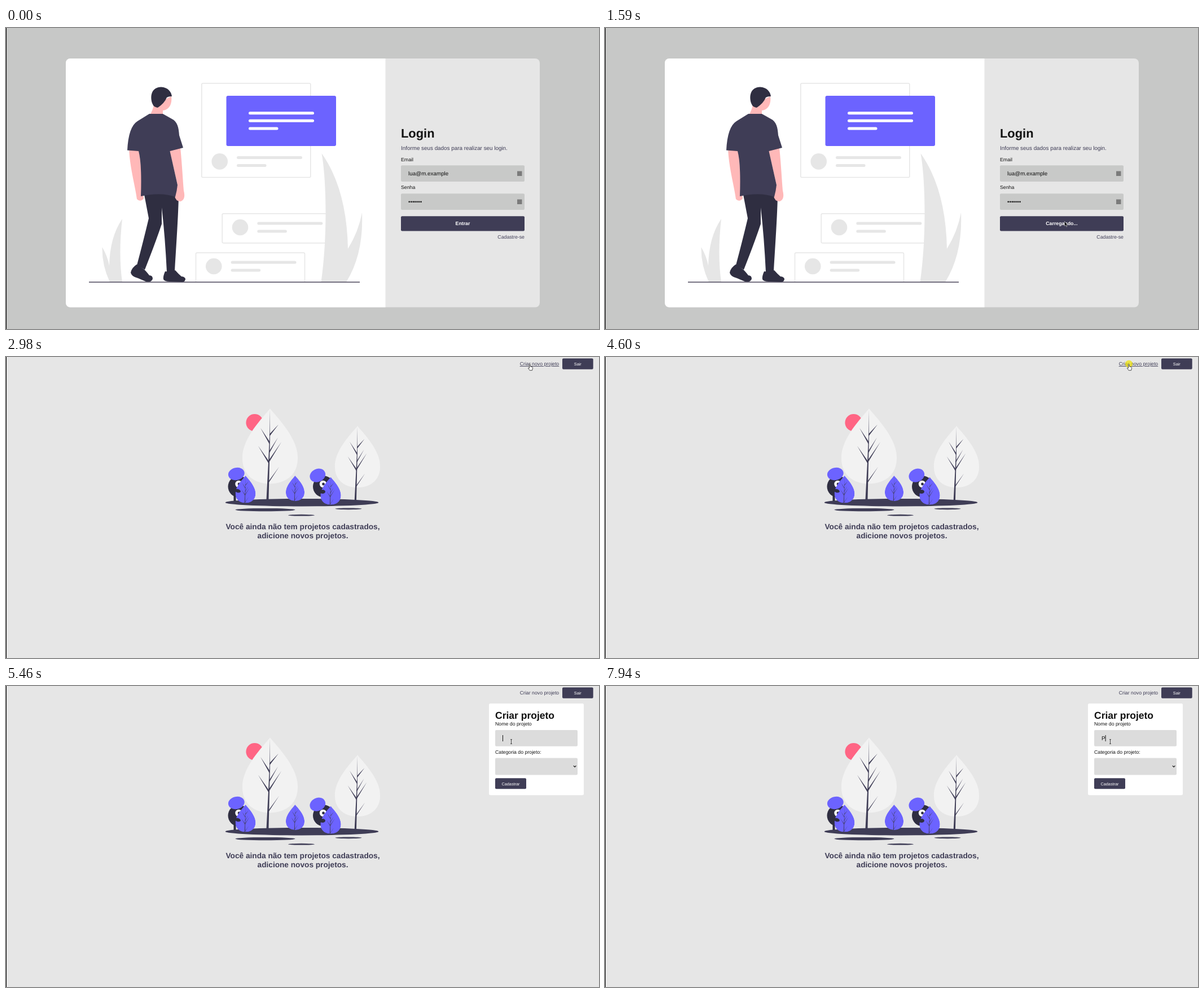
An HTML page for the animation above (8000 ms loop, 1051 by 533 pixels).

```html
<!DOCTYPE html>
<html lang="pt">
<head>
<meta charset="utf-8">
<title>Login e projetos</title>
<style>
  html, body { margin: 0; width: 100%; height: 100%; overflow: hidden; background: #e6e6e6; }
  svg { display: block; }
  text { font: 8.76px "Liberation Sans", Arial, sans-serif; fill: #111; text-rendering: geometricPrecision; white-space: pre; }
  .b { font-weight: bold; }
  .mid { text-anchor: middle; }
  .end { text-anchor: end; }
  .field { font-size: 9.85px; }
  .small { font-size: 7.3px; }
  .notice { font-size: 13.66px; }
  .white { fill: #fff; }
  .ink { fill: #3f3d56; }
  .hair { fill: #2f2e41; }
  .skin { fill: #ffb8b8; }
  .grey { fill: #e6e6e6; }
  .purple { fill: #6c63ff; }
  .input { fill: #c8c9c8; }
  .pale { fill: #dcdcdc; }
  .card { fill: none; stroke: #e6e6e6; stroke-width: 1.5; }
</style>
</head>
<body>
<svg width="1051" height="533" viewBox="0 0 1051 533">
  <defs>
    <path id="crown" d="M0 0C-14 17-50 53-49 88C-49 117-28 133 0 133C28 133 49 117 49 88C50 53 14 17 0 0Z"/>
    <clipPath id="leafClip"><use href="#crown"/></clipPath>
    <g id="trunk" class="ink">
      <path d="M0 2L-.2 60L-2.5 161H-6.5L-3 95L-1 50Z"/>
      <path d="M-1 63L-17 34L-1 58ZM-2 98L-21 66L-2 93Z"/>
      <path d="M-1 49L15 28L-1 45ZM-2 80L14 51L-2 76ZM-3 97L20 59L-2 91ZM-3 132L16 103L-3 129Z"/>
    </g>
    <g id="tree"><use href="#crown" fill="#f2f2f2"/><use href="#trunk"/></g>
    <g id="bush" clip-path="url(#leafClip)"><use href="#crown" class="purple"/><use href="#trunk"/></g>
    <rect id="long" y="-2.5" width="116" height="5" rx="2.5"/>
    <rect id="short" y="-2.5" width="52.5" height="5" rx="2.5"/>
    <g id="entry" class="grey">
      <circle r="14.3"/><use href="#long" x="30.3" y="-7"/><use href="#short" x="30.3" y="7"/>
    </g>
    <g id="eye"><circle r="6.2" fill="#fff"/><circle class="hair" cx=".5" r="2.4"/></g>
  </defs>

  <g id="login">
    <rect width="1051" height="533" fill="#c7c8c7"/>
    <rect class="grey" x="106" y="54" width="840" height="440.5" rx="8"/>
    <path class="white" d="M672.5 54H114a8 8 0 0 0-8 8V486.5a8 8 0 0 0 8 8H672.5Z"/>

    <rect class="card" x="346.8" y="98" width="193" height="166.5" rx="2"/>
    <use href="#entry" x="378.7" y="236.4"/>
    <rect class="purple" x="390.5" y="120" width="194.5" height="89" rx="3"/>
    <g class="white">
      <use href="#long" x="430" y="150.7"/><use href="#long" x="430" y="164.3"/><use href="#short" x="430" y="178"/>
    </g>
    <rect class="card" x="383.2" y="328.8" width="193" height="52" rx="2"/>
    <use href="#entry" x="415" y="353"/>
    <path class="card" d="M336.5 450V400q0-2 2-2H527.5q2 0 2 2V450"/>
    <use href="#entry" x="368.3" y="422"/>
    <path class="grey" d="M184 450Q170 420 170.5 388Q180 404 183 421Q184 370 206 338Q199 400 206 450Z
      M559.5 222Q604 285 606 391Q625 360 631 327Q634 400 603 450H558.5C570 370 568 270 559.5 222Z"/>

    <path class="skin" d="M293 121C295 136 288 145 278 146V154H255Q260 146 262 136Z
      M218 215L236 217C239 240 241 265 242 283L244 302Q238 309 232 303C229 280 220 250 218 215Z"/>
    <g class="hair">
      <path d="M259 133C255 120 258 105 275 104.500C287 105 293 113 294 121Q288 121 285 123Q281 133 269 141Q263 140 261 137Z"/>
      <path d="M245 295Q275 289 306 299C305 340 301 395 299 432H285Q282 370 276 318V347Q265 380 246 428L232 420Q244 375 253 337Z"/>
      <path d="M232 418.500Q223 424 221 433Q222 440 234 443L248 449Q258 451 260 444Q260 438 254 438Q248 430 244 427Z"/>
      <path d="M282 431Q278 440 279 445Q281 449 290 449L313 450Q318 449 318 444Q316 440 311 440Q306 436 300 429Q295 432 282 431Z"/>
    </g>
    <path class="skin" d="M290 217L309 212C312 240 313 265 315 288Q319 303 310 307Q300 307 299 297L304 278Z"/>
    <path class="ink" d="M254 152L278 152L294 161C304 166 306 176 307 190L314 212L290.5 218L304 278Q303 288 300 299Q275 290 239 298Q241 240 235 218L215 216.5Q217 175 233 165Z"/>
    <path d="M147 450H627" stroke="#4a4459" stroke-width="1.5"/>

    <text class="b" x="700" y="194" style="font-size:21.9px">Login</text>
    <text class="field ink" x="700" y="216.2">Informe seus dados para realizar seu login.</text>
    <text x="700" y="235.5">Email</text>
    <rect class="input" x="700" y="243.3" width="219" height="28.7" rx="2"/>
    <text class="field" x="713" y="261">lua@m.example</text>
    <text x="700" y="285.4">Senha</text>
    <rect class="input" x="700" y="293.2" width="219" height="28.7" rx="2"/>
    <text class="field" x="713" y="311">•••••••</text>
    <path fill="#7b7b7b" d="M906 253.5h8.5v8.5h-8.5ZM906 303.5h8.5v8.5h-8.5Z"/>
    <rect class="ink" x="700" y="333.3" width="219" height="26.2" rx="2"/>
    <text id="submit" class="b mid white" x="809.5" y="349"></text>
    <text class="end ink" x="919" y="372.6">Cadastre-se</text>
  </g>

  <g id="home">
    <rect class="grey" width="1051" height="533"/>
    <circle cx="440.7" cy="116.3" r="15.3" fill="#ff6584"/>
    <ellipse class="ink" cx="524.5" cy="257.7" rx="135.8" ry="6.8"/>
    <ellipse class="ink" cx="459.5" cy="270.6" rx="53" ry="2.7"/>
    <ellipse class="ink" cx="523.5" cy="280.2" rx="23.5" ry="1.4"/>
    <ellipse class="ink" cx="607" cy="268.8" rx="23.5" ry="1.4"/>
    <use href="#tree" transform="translate(468 91.5)"/>
    <use href="#tree" transform="translate(623 122.3) scale(.818)"/>
    <g class="hair">
      <circle cx="412.5" cy="229.5" r="19"/><rect x="403.5" y="243" width="4" height="12"/>
      <circle cx="563" cy="229.5" r="19"/>
    </g>
    <ellipse class="purple" cx="408.3" cy="207" rx="14.5" ry="11" transform="rotate(-12 408.3 207)"/>
    <ellipse class="purple" cx="552.3" cy="209.7" rx="14.3" ry="11.5" transform="rotate(-25 552.3 209.7)"/>
    <use href="#eye" x="412.5" y="225"/>
    <use href="#eye" x="562" y="225"/>
    <use href="#bush" transform="translate(424.5 210) scale(.365)"/>
    <use href="#bush" transform="translate(512.5 210) scale(.338)"/>
    <use href="#bush" transform="translate(575.5 212.5) scale(.37)"/>
    <ellipse class="hair" cx="410.5" cy="237" rx="5.5" ry="3" transform="rotate(15 410.5 237)"/>
    <ellipse class="hair" cx="561" cy="238.5" rx="5" ry="3.5"/>
    <text class="notice b mid ink" x="526" y="305.2">Você ainda não tem projetos cadastrados,</text>
    <text class="notice b mid ink" x="526" y="321.2">adicione novos projetos.</text>
    <text id="link" class="ink" x="910.7" y="15">Criar novo projeto</text>
    <rect class="ink" x="986" y="2.5" width="54.7" height="19.3" rx="2"/>
    <text class="small mid white" x="1013.3" y="15">Sair</text>

    <g id="panel">
      <rect class="white" x="856" y="31" width="168" height="162.3" rx="2.5"/>
      <text class="b" x="867" y="58" style="font-size:17.5px">Criar projeto</text>
      <text x="867" y="70">Nome do projeto</text>
      <rect class="pale" x="867" y="78" width="146" height="28.8" rx="2"/>
      <text id="typed" class="field" x="880" y="95.6">P</text>
      <rect id="caret" y="87" width="1" height="11" fill="#111"/>
      <text x="867" y="120">Categoria do projeto:</text>
      <rect class="pale" x="867" y="127.6" width="146" height="30" rx="2"/>
      <path d="M1005.8 141.2l2.3 2.3 2.3-2.3" fill="none" stroke="#111" stroke-width="1.2"/>
      <rect class="ink" x="867" y="163.3" width="55" height="19" rx="2"/>
      <text class="small mid white" x="894.5" y="175.5">Cadastrar</text>
    </g>
  </g>

  <path d="M.5 0V533" stroke="#000"/>
  <g id="cursor">
    <circle id="click" r="6.5" fill="#f0e400" opacity=".7"/>
    <path id="arrow" d="M0 0V8L1.8 6.4L3.2 9.5L4.5 9L3.2 6H5.5Z" fill="#000" stroke="#fff" stroke-width=".5"/>
    <path id="hand" d="M-.8 .8Q0-.5 .8 .8V4.5L4.5 5.6Q5.3 6 5 7.5L4 11.5H-.3L-3 7.6Q-3 6-.8 7.5Z" fill="#fff" stroke="#222" stroke-width=".8"/>
    <path id="beam" d="M-1.5-3.8H1.5M0-3.8V3.8M-1.5 3.8H1.5" fill="none" stroke="#222" stroke-width=".8"/>
  </g>
</svg>
<script>
const $ = id => document.getElementById(id);
const show = (id, on) => $(id).style.display = on ? '' : 'none';
const between = (v, a, b) => v >= a && v < b;
const inAny = (t, spans) => spans.some(([a, b]) => between(t, a, b));

// Pointer moves: start, end, number of steps, from, to
const moves = [
  [70, 510, 7, [985, 500], [788, 312]],
  [740, 890, 3, [788, 312], [814.5, 342.5]],
  [2210, 2980, 11, [814.5, 342.5], [928.5, 12.2]],
  [5000, 5150, 3, [928.5, 12.2], [895.5, 98.5]]
];
const clicks = [[1440, 1520], [4600, 4690], [5380, 5460]];
const caretOn = [[5380, 5920], [6380, 6930], [7480, 8000]];

function pointerAt(t) {
  const [start, end, steps, from, to] = moves.filter(m => t >= m[0]).pop() || moves[0];
  const step = 1 + Math.floor((t - start) / (end - start) * (steps - 1) + 1e-6);
  const k = Math.min(1, Math.max(0, step / steps));
  const eased = k * k * (3 - 2 * k);
  return from.map((v, i) => v + (to[i] - v) * eased);
}

function draw(t) {
  const home = t >= 1670, panel = t >= 4690, loading = t >= 1520, typed = t >= 7940;
  const [x, y] = pointerAt(t);
  const onLink = home && between(x, 910, 981) && between(y, 5, 18);
  const onButton = !home && !loading && between(x, 700, 919) && between(y, 333, 360);
  const onField = home
    ? panel && between(x, 867, 1013) && between(y, 78, 107)
    : between(x, 700, 919) && (between(y, 243, 272) || between(y, 293, 322));

  show('login', !home);
  show('home', home);
  show('panel', panel);
  $('submit').textContent = loading ? 'Carregando...' : 'Entrar';
  $('link').style.textDecoration = onLink ? 'underline' : 'none';

  show('typed', typed);
  show('caret', inAny(t, caretOn));
  $('caret').setAttribute('x', typed ? 886.6 : 880);

  show('cursor', t >= 70);
  $('cursor').setAttribute('transform', `translate(${x} ${y})`);
  show('click', inAny(t, clicks));
  show('hand', onLink || onButton);
  show('beam', onField);
  show('arrow', !onLink && !onButton && !onField);
}

const began = performance.now();
function tick() {
  draw((performance.now() - began) % 8000);
  requestAnimationFrame(tick);
}
tick();
</script>
</body>
</html>
```
